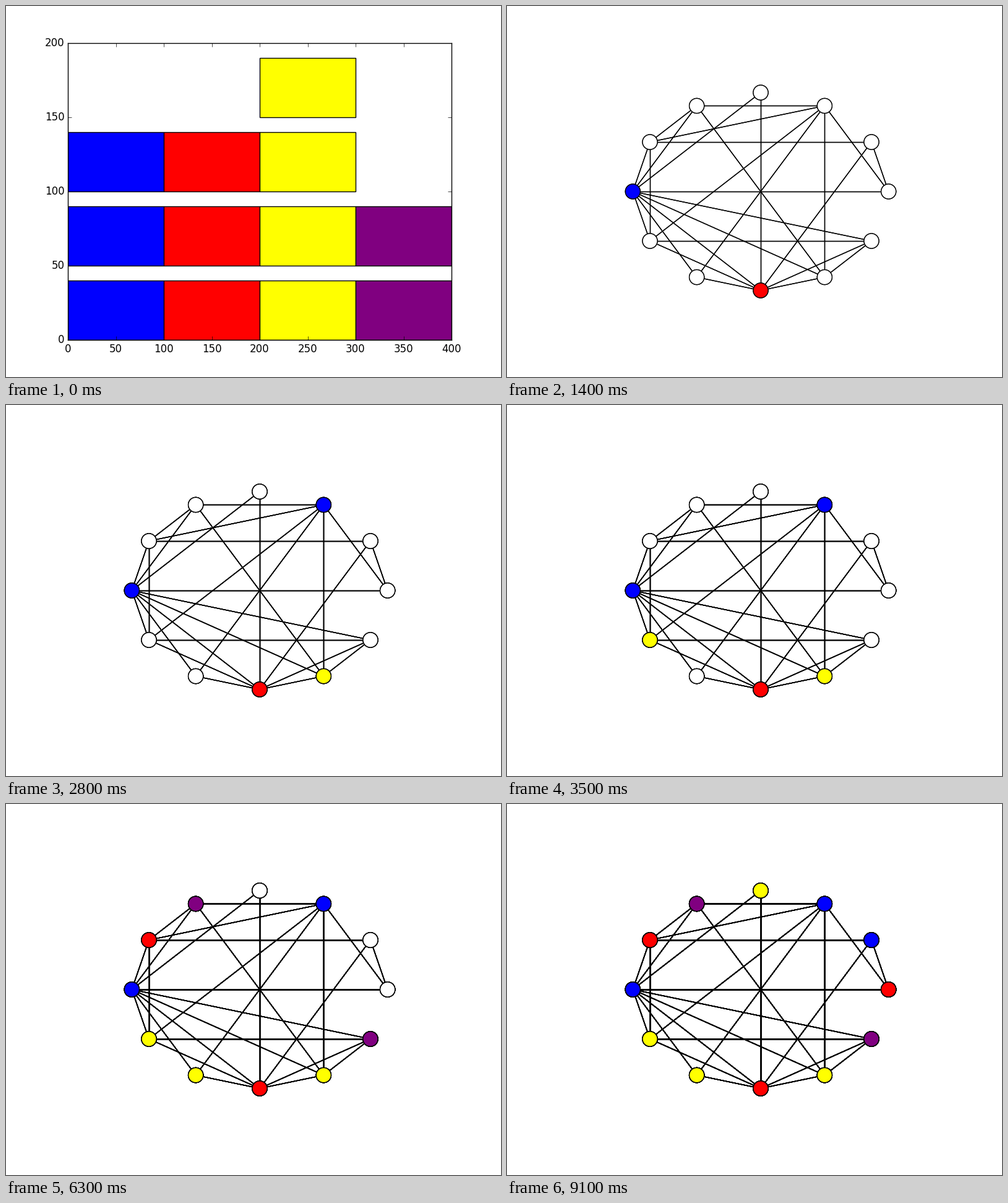
A matplotlib script that plays this animation: 800x600 px, repeating every 9800 ms.

```python
import numpy as np
import matplotlib.pyplot as plt
from matplotlib.animation import FuncAnimation
from matplotlib.collections import LineCollection

plt.rcParams.update({
    "font.family": "DejaVu Sans",
    "font.size": 12,
    "axes.linewidth": 1.0,
    "ytick.alignment": "center",
})

PALETTE = ["blue", "red", "yellow", "purple"]
N = 12
STEPS = 13
BOX = [0.125, 0.1, 0.775, 0.8]

# Neighbours with a higher index, node by node.
LINKS = {
    0: [1, 2, 6], 1: [5, 9], 2: [4, 5, 7, 8, 10], 3: [6, 9],
    4: [5, 6, 10], 5: [6, 7], 6: [7, 8, 9, 10, 11], 7: [9, 11],
    8: [9], 9: [10, 11], 10: [11],
}
EDGES = [(a, b) for a, ends in LINKS.items() for b in ends]


def greedy_coloring():
    """Colour nodes by falling degree; return visit order and colours."""
    near = {n: set() for n in range(N)}
    for a, b in EDGES:
        near[a].add(b)
        near[b].add(a)
    order = sorted(near, key=lambda n: (len(near[n]), n), reverse=True)
    color = {}
    for n in order:
        used = {color[m] for m in near[n] if m in color}
        color[n] = next(c for c in PALETTE if c not in used)
    return order, color


def make_chart(fig, color):
    ax = fig.add_axes(BOX)
    totals = list(color.values())
    for col, name in enumerate(PALETTE):
        for row in range(totals.count(name)):
            ax.barh(50 * row, 100, height=40, left=100 * col, align="edge",
                    color=name, edgecolor="black", linewidth=1)
    ax.set(xlim=(0, 400), ylim=(0, 200),
           xticks=range(0, 401, 50), yticks=range(0, 201, 50))
    ax.tick_params(direction="in", length=4, width=0.5, pad=4,
                   top=True, right=True)
    ax.set_axisbelow(False)
    return ax


def make_layers(fig, order, color):
    """One full drawing of the graph per step; later ones stack on top."""
    ax = fig.add_axes(BOX)
    ax.axis("off")
    angle = 2 * np.pi * np.arange(N) / N
    pos = np.column_stack([np.cos(angle), np.sin(angle)])
    layers = []
    for step in range(1, STEPS + 1):
        done = set(order[:step])
        fills = [color[n] if n in done else "white" for n in range(N)]
        lines = LineCollection([pos[[a, b]] for a, b in EDGES],
                               colors="black", linewidths=1, zorder=1)
        ax.add_collection(lines)
        nodes = ax.scatter(*pos.T, s=300, c=fills, edgecolors="black",
                           linewidths=1, zorder=2)
        layers.append((lines, nodes))
    ax.set(xlim=(-1.5, 1.5), ylim=(-1.5, 1.5))
    return layers


fig = plt.figure(figsize=(8, 6), dpi=100, facecolor="white")
order, color = greedy_coloring()
chart = make_chart(fig, color)
layers = make_layers(fig, order, color)


def draw(frame):
    chart.set_visible(frame == 0)
    for i, layer in enumerate(layers):
        for artist in layer:
            artist.set_visible(i < frame)
    return []


anim = FuncAnimation(fig, draw, frames=STEPS + 1, init_func=lambda: draw(0),
                     interval=700, repeat=True, repeat_delay=0)
plt.show()
```
